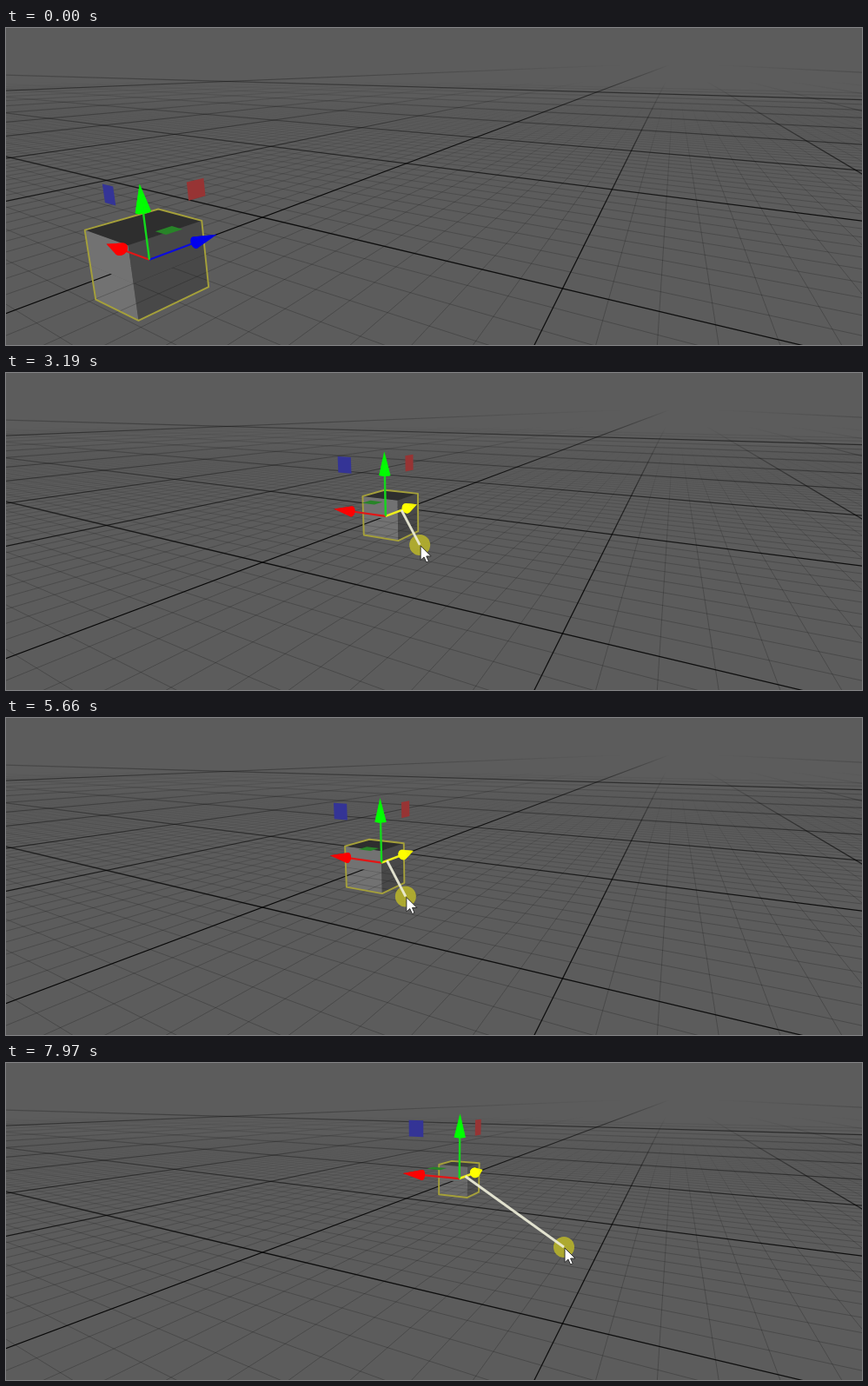
An HTML page with a canvas that plays this animation: 985 px wide and 365 px high, repeating every 8 s.

```html
<!DOCTYPE html>
<html lang="en">
<head>
<meta charset="utf-8">
<title>Dragging a cube along its axis</title>
<style>
html, body { margin: 0; width: 100%; height: 100%; overflow: hidden; background: #5c5c5c; }
canvas { display: block; }
</style>
</head>
<body>
<canvas id="stage" width="985" height="365"></canvas>
<script>
const W = 985, H = 365, LOOP = 8000;
const HOVER = 740, PRESS = 900, LAG = 35;
const ctx = document.getElementById('stage').getContext('2d');

// Perspective: three vanishing points and the grid origin on screen.
const VX = [-451, 41], VY = [492, 2790], VZ = [770, 40], O = [295, 218];
const KX = 0.03165, KY = 0.01215, KZ = 0.0535;
const CENTER = [492, 136], FOCUS = 502.6;
const START = -0.2149;

// World point (one unit = half a cube edge) to screen.
function project([x, y, z]) {
  const a = KX * x, b = -KY * y, c = KZ * z, w = 1 + a + b + c;
  return [0, 1].map(i => (O[i] + a * VX[i] + b * VY[i] + c * VZ[i]) / w);
}

const sight = p => [p[0] - CENTER[0], p[1] - CENTER[1], FOCUS];
const dot = (a, b) => a[0] * b[0] + a[1] * b[1] + a[2] * b[2];

// Depth of the point on the Z axis nearest to the view ray through p.
function nearest(p) {
  const r = sight(p), d = sight(VZ), o = sight(O);
  const rr = dot(r, r), dr = dot(d, r);
  return (dot(o, r) * dr - dot(o, d) * rr) / (dot(d, d) * rr - dr * dr);
}

function fade(c, stops) {
  const g = c.createLinearGradient(0, 0, 0, H);
  for (const [y, alpha] of stops) g.addColorStop(y / H, `rgba(0,0,0,${alpha})`);
  return g;
}

function makeGrid() {
  const layer = document.createElement('canvas');
  layer.width = W;
  layer.height = H;
  const c = layer.getContext('2d');
  const minor = fade(c, [[82, 0], [110, 0.05], [145, 0.12], [200, 0.18], [365, 0.21]]);
  const major = fade(c, [[62, 0], [80, 0.12], [100, 0.28], [140, 0.55], [220, 0.85]]);
  const strong = fade(c, [[43, 0], [52, 0.18], [75, 0.5], [120, 0.8], [200, 0.92]]);

  function ray(vp, p, style, width) {
    const dx = p[0] - vp[0], dy = p[1] - vp[1], k = 3000 / Math.hypot(dx, dy);
    c.strokeStyle = style;
    c.lineWidth = width;
    c.beginPath();
    c.moveTo(...vp);
    c.lineTo(vp[0] + dx * k, vp[1] + dy * k);
    c.stroke();
  }
  function family(vp, from, to, phase, at) {
    for (let i = from; i <= to; i++) {
      const main = i % 10 === 0;
      const style = !main ? minor : (i - phase) % 100 === 0 ? strong : major;
      ray(vp, project(at(i)), style, main ? 1.25 : 1);
    }
  }
  family(VZ, -120, 120, 0, i => [i, 0, 60]);
  family(VX, -45, 100, 80, i => [60, 0, i]);
  return layer;
}
const grid = makeGrid();

// Cursor path: time, x, y
const KEYS = [
  [0, 230, 400], [800, 205, 252], [1650, 240, 309], [2140, 269, 305], [3190, 476, 198],
  [4270, 609, 133], [4540, 622, 126], [5060, 558, 160], [5750, 443, 213],
  [6100, 363, 247], [6260, 380, 231], [6575, 455, 199], [7400, 540, 195], [7970, 642, 212]
];

function slope(i, n) {
  if (i === 0 || i === KEYS.length - 1) return 0;
  const p = KEYS[i - 1], k = KEYS[i], q = KEYS[i + 1];
  const l = (k[n] - p[n]) / (k[0] - p[0]), r = (q[n] - k[n]) / (q[0] - k[0]);
  return l * r <= 0 ? 0 : 2 * l * r / (l + r);
}

// Monotone cubic through the keys.
function cursor(t) {
  let i = 0;
  while (i < KEYS.length - 2 && t >= KEYS[i + 1][0]) i++;
  const a = KEYS[i], b = KEYS[i + 1], d = b[0] - a[0];
  const s = Math.min(1, (t - a[0]) / d), r = 1 - s;
  return [1, 2].map(n => a[n] * (1 + 2 * s) * r * r + b[n] * (3 - 2 * s) * s * s
    + d * s * r * (slope(i, n) * r - slope(i + 1, n) * s));
}

// The cube follows the cursor from the place where it was grabbed.
const grip = nearest(cursor(PRESS)) - START;
const cubeDepth = t => t < PRESS ? START : nearest(cursor(t)) - grip;

function path(points) {
  ctx.beginPath();
  points.forEach(p => ctx.lineTo(...p));
  ctx.closePath();
}
function fill(points, color) {
  path(points);
  ctx.fillStyle = color;
  ctx.fill();
}
function line(a, b, color, width) {
  ctx.strokeStyle = color;
  ctx.lineWidth = width;
  ctx.beginPath();
  ctx.moveTo(...a);
  ctx.lineTo(...b);
  ctx.stroke();
}

function drawCube(depth) {
  const haze = Math.max(0, Math.min(0.92, (depth - 0.5) / 1.2));
  const tone = v => {
    const g = Math.round(v + (92 - v) * haze);
    return `rgb(${g},${g},${g})`;
  };
  const at = (x, y, z) => project([x, y, depth / KZ + z]);
  const sides = low => {
    fill([at(1, 1, -1), at(-1, 1, -1), at(-1, low, -1), at(1, low, -1)], tone(114));
    fill([at(-1, 1, -1), at(-1, 1, 1), at(-1, low, 1), at(-1, low, -1)], tone(72));
  };
  // The ground plane cuts the cube at half height.
  sides(-1);
  ctx.drawImage(grid, 0, 0);
  sides(0);
  fill([at(1, 1, -1), at(1, 1, 1), at(-1, 1, 1), at(-1, 1, -1)], tone(46));

  path([at(1, 1, -1), at(1, 1, 1), at(-1, 1, 1), at(-1, -1, 1), at(-1, -1, -1), at(1, -1, -1)]);
  ctx.lineJoin = 'round';
  ctx.strokeStyle = '#a5a03a';
  ctx.lineWidth = 1.9;
  ctx.stroke();
}

function drawGizmo(depth, hot) {
  const z = depth / KZ, base = project([0, 0, z]);
  // Keeps nearly the same size on screen at any distance.
  const size = 2.25 * (1 + depth) * Math.hypot(...sight(base)) / FOCUS;
  const at = v => project([v[0] * size, v[1] * size, z + v[2] * size]);

  function plane(normal, color) {
    const [i, j] = [0, 1, 2].filter(n => n !== normal);
    fill([[-1, -1], [1, -1], [1, 1], [-1, 1]].map(([p, q]) => {
      const v = [0, 0, 0];
      v[i] = 0.75 + 0.13 * p;
      v[j] = 0.75 + 0.13 * q;
      return at(v);
    }), color);
  }
  function arrow(axis, shaft, head, width) {
    const [i, j] = [0, 1, 2].filter(n => n !== axis);
    const along = d => {
      const v = [0, 0, 0];
      v[axis] = d;
      return v;
    };
    const rim = Array.from({ length: 20 }, (_, n) => {
      const v = along(0.64), a = n * Math.PI / 10;
      v[i] = 0.085 * Math.cos(a);
      v[j] = 0.085 * Math.sin(a);
      return at(v);
    });
    const tip = at(along(1));
    line(base, at(along(0.66)), shaft, width);
    fill(rim, head);
    rim.forEach((p, n) => fill([tip, p, rim[(n + 1) % 20]], head));
  }

  plane(2, '#343496');
  plane(0, '#973434');
  plane(1, '#288428');
  arrow(0, '#e21616', '#ff0000', 2.2);
  if (hot) arrow(2, '#eeee1c', '#ffff00', 2.6);
  else arrow(2, '#0c0cdc', '#0000ee', 2.2);
  arrow(1, '#14d81c', '#00ff00', 2.4);
}

function drawPointer([x, y]) {
  path([[0, 0], [0, 16.5], [3.9, 13], [6.6, 19], [9.2, 17.9], [6.6, 12], [12, 12]]
    .map(p => [x + 1 + p[0], y + 1 + p[1]]));
  ctx.fillStyle = '#fff';
  ctx.fill();
  ctx.strokeStyle = '#222';
  ctx.lineWidth = 0.9;
  ctx.stroke();
}

function draw(t) {
  const tip = cursor(t);
  ctx.fillStyle = '#5c5c5c';
  ctx.fillRect(0, 0, W, H);
  drawCube(cubeDepth(t));
  drawGizmo(cubeDepth(t - LAG), t > HOVER);

  if (t >= PRESS) {
    ctx.fillStyle = 'rgba(184,180,42,0.88)';
    ctx.beginPath();
    ctx.arc(...tip, 12, 0, 2 * Math.PI);
    ctx.fill();
    line(project([0, 0, nearest(tip) / KZ]), tip, 'rgba(238,238,218,0.92)', 2.8);
  }
  drawPointer(tip);
}

function frame() {
  draw(performance.now() % LOOP);
  requestAnimationFrame(frame);
}
frame();
</script>
</body>
</html>
```
